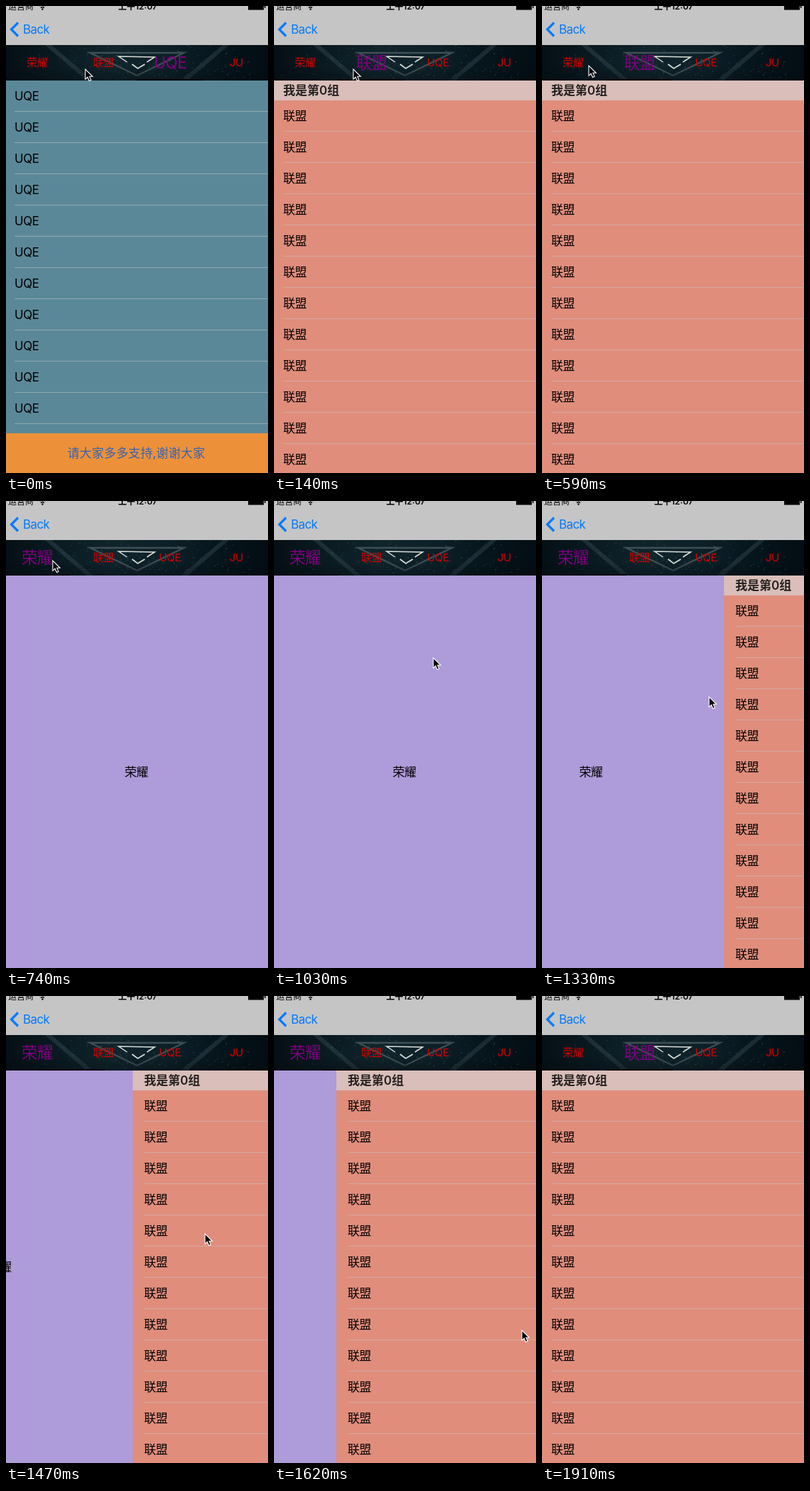
Animation, 370 px wide and 658 px high, one loop 2.51 s. Source, as an HTML page with a canvas:

```html
<!DOCTYPE html>
<html lang="zh-CN">
<head>
<meta charset="utf-8">
<title>Paged tabs</title>
<style>
  html, body { margin: 0; width: 100%; height: 100%; overflow: hidden; }
  body { background: #c5c5c5; }
  #stage {
    position: relative; width: 370px; height: 658px; overflow: hidden;
    background: #c5c5c5; color: #000;
    font: 17px/44px Inter, "Noto Sans CJK SC", "Noto Sans CJK", sans-serif;
    letter-spacing: -0.4px; white-space: nowrap;
  }
  #stage div, #stage svg { position: absolute; }
  .status { top: -7px; font-size: 12px; line-height: 16px; letter-spacing: 0; }
  .back { left: 24px; top: 11px; color: #007aff; letter-spacing: -0.6px; }
  #banner { position: absolute; left: 0; top: 55px; }
  .tab {
    top: 58px; width: 94px; text-align: center; font-size: 15px;
    letter-spacing: -0.3px; color: #d80000;
  }
  .tab.on { color: #800080; transform: scale(1.5); }
  #bar { left: -3px; top: 103px; width: 94px; height: 2px; background: #000; }
  #view { left: 0; top: 105px; width: 370px; height: 553px; overflow: hidden; }
  #strip { left: 0; top: 0; }
  .page { top: 0; width: 376px; height: 553px; overflow: hidden; }
  .row { left: 16px; right: 0; height: 43px; border-bottom: 1px solid; }
  .row span { color: #000; }
  .label { left: 0; top: 255px; width: 376px; text-align: center; }
  .head {
    left: 0; top: 0; width: 360px; height: 28px; padding-left: 16px;
    line-height: 28px; font-weight: 600; letter-spacing: 0;
    color: #242120; background: #d9beb9;
  }
  .foot {
    left: 0; top: 497px; width: 376px; height: 56px; line-height: 56px;
    text-align: center; letter-spacing: 0.2px; color: #3463b4; background: #ec9139;
  }
  #cursor { left: 0; top: 0; }
</style>
</head>
<body>
<div id="stage">
  <div class="status" style="left:3px">运营商</div>
  <div class="status" style="left:86px;width:200px;text-align:center;font-weight:600">上午12:07</div>
  <svg width="370" height="55" style="left:0;top:0" fill="none">
    <path d="M47 0Q51.500 -3 56 0M49 2.500Q51.500 .5 54 2.500" stroke="#000" stroke-width="1.5"/>
    <circle cx="51.500" cy="4.500" r="1.200" fill="#000"/>
    <path d="M342 -2H364V5.500H342ZM365 -1H366.500V3H365Z" fill="#000"/>
    <path d="M17 23.500L7.500 33L17 42.500" stroke="#007aff" stroke-width="3.200"/>
  </svg>
  <div class="back">Back</div>
  <canvas id="banner" width="370" height="50"></canvas>
  <div id="bar"></div>
  <div id="view"><div id="strip"></div></div>
  <svg id="cursor" width="14" height="20" viewBox="-1 -1 14 20">
    <path d="M.5 .5V14.800L3.700 11.800L6 17L8.600 15.900L6.400 10.800H10.800Z"
      fill="#000" stroke="#fff" stroke-width="1.100"/>
  </svg>
</div>
<script>
const $ = id => document.getElementById(id);
const PAGE = 375, LOOP = 2510;
const names = ['荣耀', '联盟', 'UQE', 'JU'];

// start ms, selected tab, scroll offset, pointer x, pointer y
const steps = [
  [0, 2, 750, 111, 88],
  [140, 1, 375, 111, 88],
  [440, 1, 375, 75, 83],
  [590, 1, 375, 65, 83],
  [740, 0, 0, 65, 83],
  [890, 0, 0, 181, 149],
  [1030, 0, 0, 224, 220],
  [1180, 0, 5, 192, 213],
  [1330, 0, 115, 235, 275],
  [1470, 0, 193, 280, 334],
  [1620, 0, 284, 349, 470],
  [1770, 1, 375, 283, 646],
  [1910, 1, 375, -40, -40]
];

function add(parent, cls, text = '') {
  const el = document.createElement('div');
  el.className = cls;
  el.textContent = text;
  parent.append(el);
  return el;
}

function addPage(left, color) {
  const page = add($('strip'), 'page');
  page.style.left = left + 'px';
  page.style.background = color;
  return page;
}

function addRows(page, text, top, line) {
  for (let y = top; y < 553; y += 44) {
    const row = add(page, 'row');
    row.style.top = y + 'px';
    row.style.borderColor = line;
    row.innerHTML = `<span>${text}</span>`;
  }
}

function buildPages() {
  const first = addPage(-4, '#ae9bd9');
  add(first, 'label', names[0]);

  const second = addPage(PAGE - 3, '#e08d7c');
  add(second, 'head', '我是第0组');
  addRows(second, names[1], 28, '#d2aaa2');

  const third = addPage(2 * PAGE - 4, '#5b8898');
  addRows(third, names[2], 0, '#8fa9b1');
  add(third, 'foot', '请大家多多支持,谢谢大家');
}

function drawBanner() {
  const g = $('banner').getContext('2d');
  const fade = g.createLinearGradient(0, 0, 370, 0);
  [[0, '#051016'], [.2, '#0a1a21'], [.4, '#10242b'], [.6, '#0d2028'], [.85, '#05131a'], [1, '#030d13']]
    .forEach(([at, color]) => fade.addColorStop(at, color));
  g.fillStyle = fade;
  g.fillRect(0, 0, 370, 50);

  const line = (color, width, ...pts) => {
    g.strokeStyle = color;
    g.lineWidth = width;
    g.beginPath();
    for (let i = 0; i < pts.length; i += 2) g.lineTo(pts[i], pts[i + 1]);
    g.stroke();
  };
  line('#78969d2c', 6, 56, -3, 122, 53);
  line('#78969d2c', 6, 314, -3, 248, 53);

  let seed = 7;
  const rnd = () => (seed = seed * 16807 % 2147483647) / 2147483647;
  for (let i = 0; i < 260; i++) {
    const x = 370 * (rnd() + rnd()) / 2, y = rnd() * 50;
    g.fillStyle = `rgba(150,175,180,${rnd() * .35})`;
    g.fillRect(x, y, 1 + rnd(), 1);
  }

  line('#4a5a60cc', 2.500, 185, 43, 119, 11, 251, 11, 185, 43);
  line('#d9ddd8', 1.500, 171, 24, 159, 16, 210, 17, 199, 24);
  line('#d9ddd8', 1.800, 178, 27, 186, 33, 196, 27);

  const shade = g.createLinearGradient(0, 30, 0, 50);
  shade.addColorStop(0, '#02090d00');
  shade.addColorStop(1, '#02090d60');
  g.fillStyle = shade;
  g.fillRect(0, 30, 370, 20);
}

const tabs = names.map((name, i) => {
  const tab = add($('stage'), 'tab', name);
  tab.style.left = -3 + i * 93.75 + 'px';
  return tab;
});
$('stage').append($('cursor'));
buildPages();
drawBanner();

const moveTo = (id, x, y = 0) => $(id).style.transform = `translate(${x}px,${y}px)`;

let shown;
function show(step) {
  if (step === shown) return;
  shown = step;
  const [, tab, offset, x, y] = step;
  tabs.forEach((el, i) => el.classList.toggle('on', i === tab));
  moveTo('strip', -offset);
  moveTo('bar', offset / 4);
  moveTo('cursor', x - 0.5, y - 0.5);
}

const start = performance.now();
function tick() {
  const t = (performance.now() - start) % LOOP;
  show(steps.findLast(s => s[0] <= t));
  requestAnimationFrame(tick);
}
tick();
</script>
</body>
</html>
```
